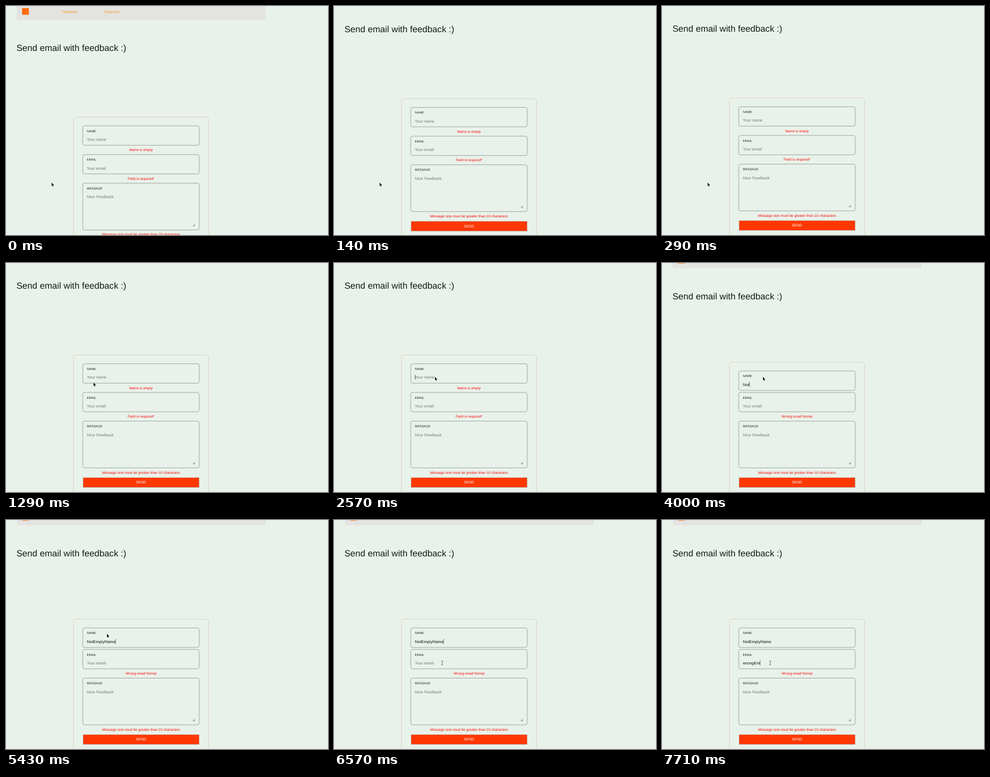
An HTML page with a canvas that plays this animation: 600 px wide and 428 px high, repeating every 8000 ms.

```html
<!DOCTYPE html>
<html lang="en">
<head>
<meta charset="utf-8">
<title>Feedback form</title>
<style>
  html, body { margin: 0; width: 100%; height: 100%; overflow: hidden; background: #e9f2ea; }
  canvas { display: block; }
</style>
</head>
<body>
<canvas id="stage"></canvas>
<script>
const W = 600, H = 428, LOOP = 8000, FPS = 7;
const canvas = document.getElementById('stage');
const ctx = canvas.getContext('2d');
const dpr = window.devicePixelRatio || 1;
canvas.width = W * dpr;
canvas.height = H * dpr;
canvas.style.width = W + 'px';
canvas.style.height = H + 'px';

const FONT = '"Liberation Sans", Arial, sans-serif';
const TEXT_X = 150.8;
const MID_X = 251.6;

// Pointer stops: tick, x, y, shape
const POINTER = [
  [0, 85, 330, 'arrow'], [4, 70, 326, 'arrow'], [5, 36, 304, 'arrow'],
  [6, 24, 278, 'arrow'], [7, 50, 249, 'arrow'], [8, 112, 232, 'arrow'],
  [9, 163, 223.4, 'arrow'], [10, 180, 217, 'beam'], [11, 187, 214, 'beam'],
  [12, 188, 213.3, 'beam'], [18, 188, 212.8, 'arrow'], [41, 202, 199, 'arrow'],
  [42, 222, 188, 'arrow'], [43, 235, 206, 'beam'], [44, 230, 236, 'beam'],
  [45, 209, 269, 'beam'], [46, 201.6, 267, 'beam']
];

// Value of the last key at or before the tick
function held(keys, tick) {
  let found = keys[0];
  for (const key of keys) if (key[0] <= tick) found = key;
  return found;
}

function text(str, x, y, size, color, align = 'left') {
  ctx.font = `${size}px ${FONT}`;
  ctx.textAlign = align;
  ctx.fillStyle = color;
  ctx.fillText(str, x, y);
}

function outline(x, y, w, h, r, color, width) {
  ctx.beginPath();
  ctx.roundRect(x, y, w, h, r);
  ctx.strokeStyle = color;
  ctx.lineWidth = width;
  ctx.stroke();
}

function field(y, h, label, hint, value, caret) {
  outline(143, y, 217, h, 3.6, '#9aa39c', 1);
  text(label, TEXT_X, y + 11.6, 5.83, '#222');
  const base = y + 28;
  text(value || hint, TEXT_X, base, 7.5, value ? '#111' : '#747a75');
  if (caret) {
    const x = TEXT_X + (value ? ctx.measureText(value).width : 0);
    ctx.fillStyle = '#111';
    ctx.fillRect(x, base - 7.2, 0.7, 8.8);
  }
}

function error(str, y) {
  text(str, MID_X, y, 6.62, '#f80808', 'center');
}

function grip(x, y) {
  ctx.beginPath();
  ctx.moveTo(x, y);
  ctx.lineTo(x, y - 4.4);
  ctx.lineTo(x - 4.4, y);
  ctx.fillStyle = '#9da39e';
  ctx.fill();
}

function button(y) {
  ctx.fillStyle = '#b3a79d';
  ctx.fillRect(143.3, y - 0.3, 216.9, 18.9);
  ctx.fillStyle = '#ff3802';
  ctx.fillRect(144, y + 0.2, 215.5, 17.6);
  text('SEND', MID_X, y + 11.1, 6.85, '#fff', 'center');
}

function header(dy) {
  ctx.fillStyle = '#e3e3e1';
  ctx.fillRect(20, -20 - dy, 463.6, 45.6);
  ctx.fillStyle = '#ff6d0a';
  ctx.fillRect(30, 4 - dy, 12.6, 12.4);
  text('Feedback', 104, 12.6 - dy, 6.7, '#ff9a1f');
  text('Organizer', 182, 12.6 - dy, 6.7, '#ff9a1f');
}

function arrow(x, y) {
  ctx.beginPath();
  ctx.moveTo(x, y);
  ctx.lineTo(x, y + 6.4);
  ctx.lineTo(x + 1.5, y + 5.2);
  ctx.lineTo(x + 2.5, y + 7.5);
  ctx.lineTo(x + 3.6, y + 7);
  ctx.lineTo(x + 2.7, y + 4.8);
  ctx.lineTo(x + 4.6, y + 4.7);
  ctx.closePath();
  ctx.strokeStyle = '#fff';
  ctx.lineWidth = 0.8;
  ctx.stroke();
  ctx.fillStyle = '#111';
  ctx.fill();
}

function beam(x, y) {
  ctx.beginPath();
  ctx.moveTo(x - 1.8, y - 3.6);
  ctx.quadraticCurveTo(x, y - 3.6, x, y - 2.4);
  ctx.lineTo(x, y + 2.4);
  ctx.quadraticCurveTo(x, y + 3.6, x - 1.8, y + 3.6);
  ctx.moveTo(x + 1.8, y - 3.6);
  ctx.quadraticCurveTo(x, y - 3.6, x, y - 2.4);
  ctx.moveTo(x, y + 2.4);
  ctx.quadraticCurveTo(x, y + 3.6, x + 1.8, y + 3.6);
  ctx.strokeStyle = '#444';
  ctx.lineWidth = 0.8;
  ctx.stroke();
}

function nameLength(tick) {
  if (tick < 31) return held([[0, 0], [19, 2], [20, 3]], tick)[1];
  return Math.min(12, tick - 27 + (tick >= 36 ? 1 : 0));
}

function draw(ms) {
  const tick = Math.floor((ms + 5) * FPS / 1000);
  const name = 'NotEmptyName'.slice(0, nameLength(tick));
  const email = 'wrongEm'.slice(0, held([[0, 0], [50, 2], [51, 4], [53, 6], [54, 7]], tick)[1]);
  const nameCaret = held([[0, 0], [13, 1], [21, 0], [28, 1], [29, 0], [31, 1], [49, 0]], tick)[1];

  // The page is pinned to its bottom, so losing one error row pushes the top down
  const low = held([[0, 0], [1, 34.4], [2, 35.7]], tick)[1];
  const top = name ? 15.6 : low;
  const mid = name ? 22.2 : low;

  ctx.setTransform(dpr, 0, 0, dpr, 0, 0);
  ctx.textRendering = 'geometricPrecision';
  ctx.fillStyle = '#e9f2ea';
  ctx.fillRect(0, 0, W, H);

  header(top);
  text('Send email with feedback :)', 19.4, 83.6 - top, 16.66, '#161a17');
  outline(125.7, 207.6 - mid, 251.7, 300, 4, '#dfc9bd', 0.9);

  field(224 - mid, 36.3, 'NAME', 'Your name', name, nameCaret);
  if (!name) error('Name is empty', 271.2 - mid);
  field(277.6 - low, 36.2, 'EMAIL', 'Your email', email, tick >= 49);
  error(name ? 'Wrong email format' : 'Field is required*', 324.8 - low);
  field(331.2 - low, 87.4, 'MESSAGE', 'Nice Feedback', '', false);
  grip(352, 411.6 - low);
  error('Message size must be greater than 10 characters', 429.3 - low);
  button(436.9 - low);

  const [, x, y, shape] = held(POINTER, tick);
  (shape === 'beam' ? beam : arrow)(x, y);
}

function loop() {
  draw(performance.now() % LOOP);
  requestAnimationFrame(loop);
}
loop();
</script>
</body>
</html>
```
